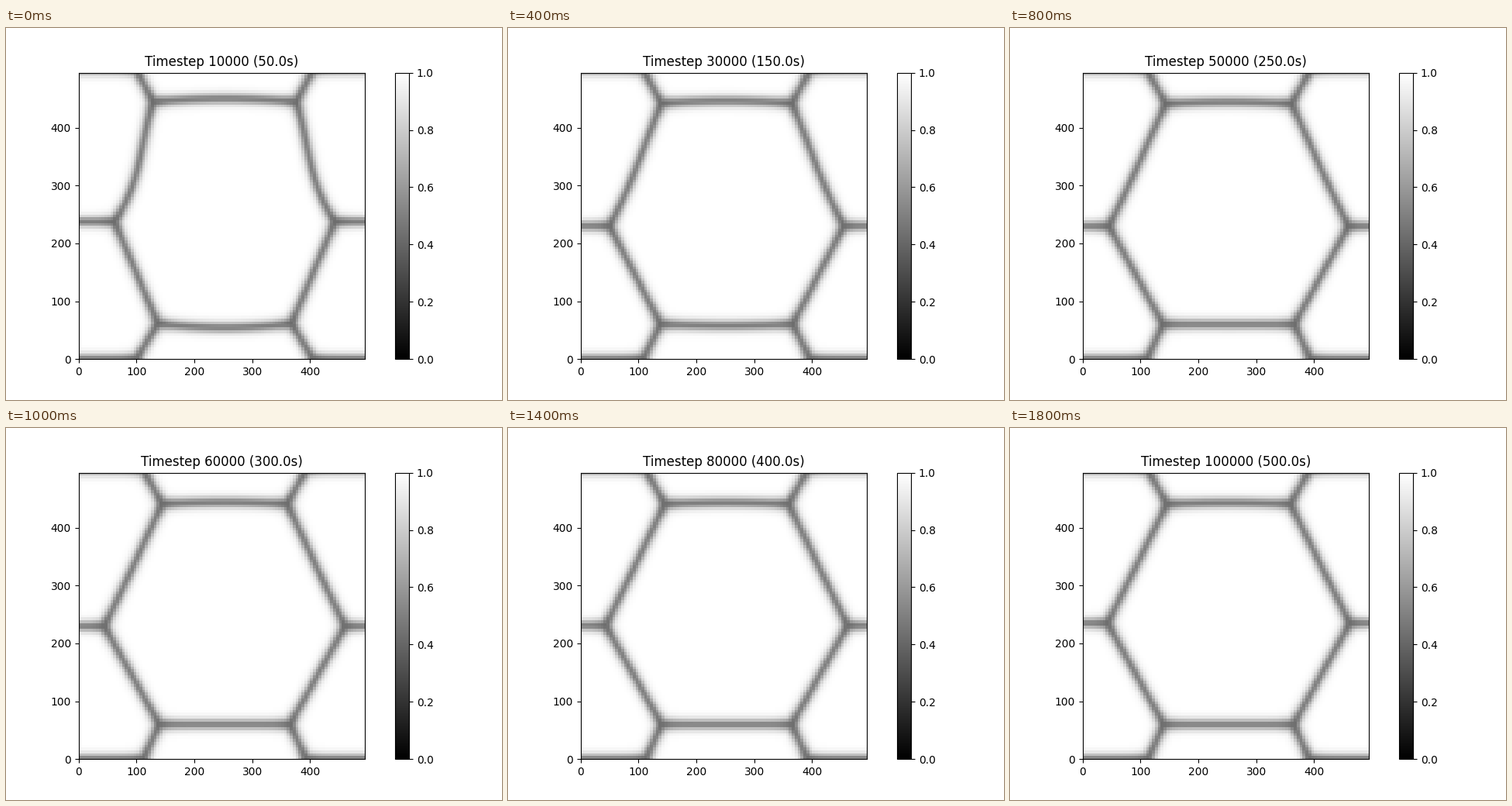
Write a matplotlib script that moves like this. It is 640 by 480 pixels and loops after 2000 ms.

```python
import numpy as np
import matplotlib.pyplot as plt
from matplotlib.animation import FuncAnimation
from matplotlib.path import Path

PERIOD = 500       # size of the periodic domain
STEP = 5           # grid spacing
WIDTH = 8.5        # half width of a diffuse boundary
MID = 252.5        # mirror axis
FRAMES = 10

edges = np.arange(0, PERIOD, STEP)
centres = edges[:-1] + STEP / 2
gx, gy = (a.ravel() for a in np.meshgrid(centres, centres))


def relax(i, start, end, tau=2):
    """Exponential decay from start to end."""
    return end + (start - end) * np.exp(-i / tau)


def side_height(i):
    """Quick drop, then a late slip upwards by one grid row."""
    slip = STEP / (1 + np.exp(-3 * (i - 7.5)))
    return relax(i, 237.5, 229.8, tau=0.66) + slip


def curve(a, b, shape, dx=0, dy=0, n=14):
    """Points from a to b, pushed sideways by a shape function."""
    t = np.linspace(0, 1, n)[:, None]
    return (1 - t) * a + t * b + shape(t) * np.array([dx, dy])


def arch(t):
    return 4 * t * (1 - t)


def skewed(t):
    return 6.75 * t * (1 - t) ** 2


def mirror(points):
    return np.array([2 * MID, 0]) + points * np.array([-1, 1])


def signed_distance(outline, centre):
    """Distance to a closed outline, negative inside, in the nearest image."""
    cx, cy = centre
    half = PERIOD / 2
    x = (gx - cx + half) % PERIOD - half + cx
    y = (gy - cy + half) % PERIOD - half + cy
    best = np.full(x.shape, np.inf)
    for (x0, y0), (x1, y1) in zip(outline, np.roll(outline, -1, axis=0)):
        ex, ey = x1 - x0, y1 - y0
        length2 = ex * ex + ey * ey
        if length2 < 1e-9:
            continue
        t = np.clip(((x - x0) * ex + (y - y0) * ey) / length2, 0, 1)
        best = np.minimum(best, np.hypot(x - x0 - t * ex, y - y0 - t * ey))
    closed = np.vstack([outline, outline[:1]])
    inside = Path(closed).contains_points(np.column_stack([x, y]))
    return np.where(inside, -best, best)


def grains(i):
    """Outlines and centres of the four grains at step i."""
    side = np.array([relax(i, 62, 42.8), side_height(i)])
    top = np.array([relax(i, 129, 146), relax(i, 444.5, 440.5)])
    low = np.array([relax(i, 137, 141, tau=5), relax(i, 61.5, 60)])
    cut = np.array([relax(i, 100, 113), 0])
    right = np.array([PERIOD, 0])
    up = np.array([0, PERIOD])

    rise = curve(side, top, skewed, dx=relax(i, 11, 0))
    roof = curve(top, mirror(top), arch, dy=relax(i, 5.5, 2, tau=4))
    floor = curve(low, mirror(low), arch, dy=-7 * np.exp(-(i / 2) ** 2))

    big = np.vstack([rise, roof, mirror(rise)[::-1], floor[::-1]])
    small = np.vstack([cut, floor, mirror(cut), roof[::-1] - up])
    upper = np.vstack([rise, cut + up, mirror(cut) + up - right,
                       mirror(rise)[::-1] - right])
    lower = np.vstack([side, low, cut, mirror(cut) - right,
                       mirror(low) - right, mirror(side) - right])
    edge = MID - PERIOD / 2
    return [(big, (MID, 250)), (small, (MID, 0)),
            (upper, (edge, 370)), (lower, (edge, 120))]


def field(i):
    """Sum of squared phase fractions, lifted a little at triple points."""
    d = np.array([signed_distance(*grain) for grain in grains(i)])
    weight = np.exp(-(d - d.min(axis=0)) / WIDTH)
    phase = weight / weight.sum(axis=0)
    squares, cubes = (phase ** 2).sum(axis=0), (phase ** 3).sum(axis=0)
    triple = (1 - 3 * squares + 2 * cubes) / 6
    return (squares + 2.5 * triple).reshape(len(centres), -1)


fig, ax = plt.subplots(figsize=(6.4, 4.8), dpi=100)
mesh = ax.pcolormesh(edges, edges, field(0), cmap="gray", vmin=0, vmax=1)
fig.colorbar(mesh, ax=ax)
ax.set_aspect("equal")
ax.set_anchor("C")  # the colorbar would pull the square to the right
title = ax.set_title("")


def draw(i):
    steps = (i + 1) * 10000
    mesh.set_array(field(i))
    title.set_text(f"Timestep {steps} ({steps * 0.005:.1f}s)")
    return mesh, title


anim = FuncAnimation(fig, draw, frames=FRAMES, interval=200, repeat=True,
                     repeat_delay=0, blit=False)
plt.show()
```
